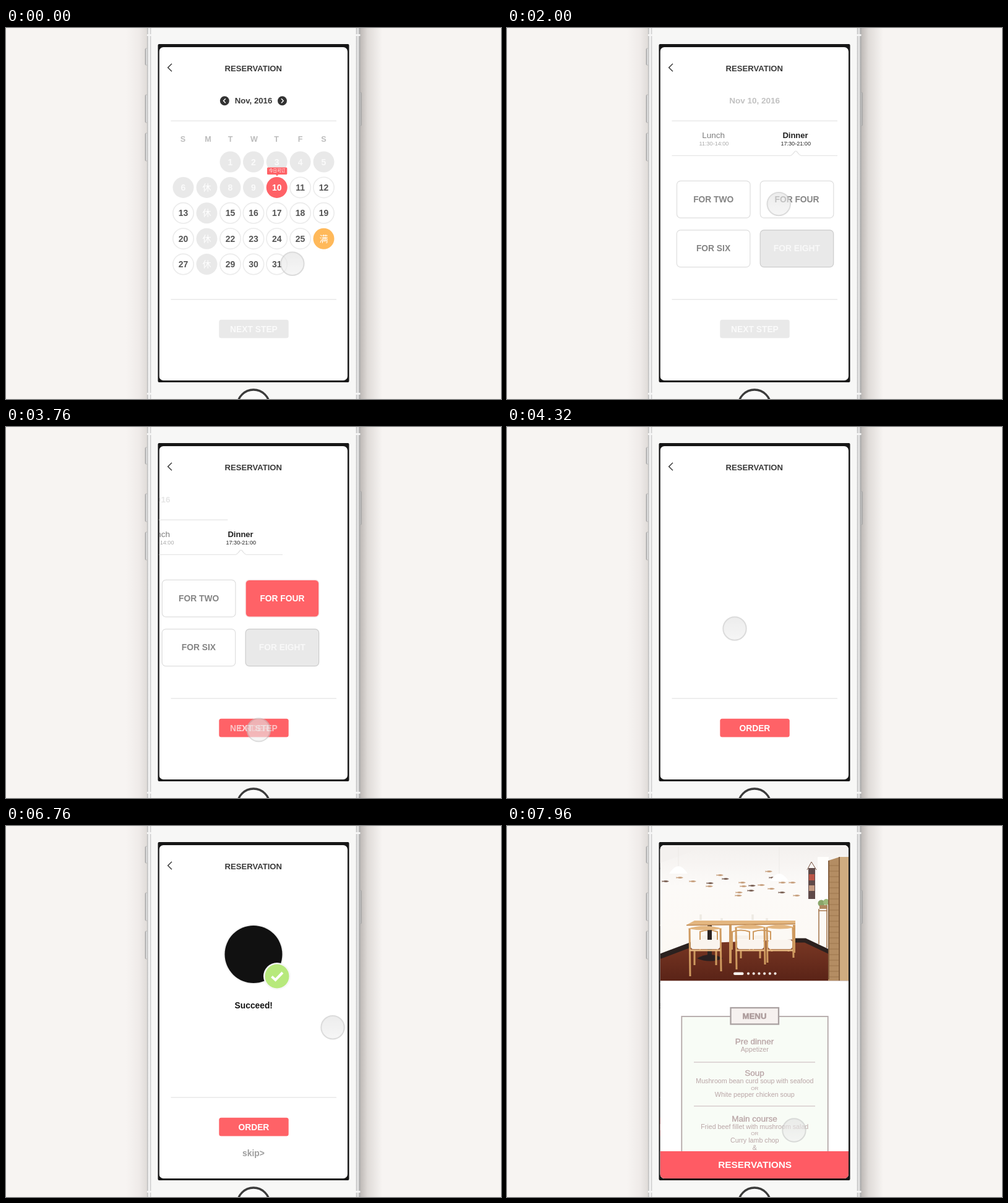
Recreate the animation shown at these times as an HTML page. Size 800 px wide and 600 px high, loop 8 s.

```html
<!DOCTYPE html>
<html lang="en">
<head>
<meta charset="utf-8">
<title>Table reservation</title>
<style>
html, body { margin: 0; width: 100%; height: 100%; overflow: hidden; background: #f7f4f2; }
svg { display: block; width: 100vw; height: 100vh; }
text { font-family: "Liberation Sans", Arial, Helvetica, sans-serif; text-anchor: middle; }
.b { font-weight: bold; }
.cjk { font-family: "Noto Sans CJK SC", "Noto Sans CJK", sans-serif; }
.m { stroke: #b9a5a6; stroke-width: .35; }
</style>
</head>
<body>
<svg id="stage" viewBox="0 0 800 600" xmlns="http://www.w3.org/2000/svg"></svg>
<script>
const LOOP = 8000, RED = '#ff6267', GRAY = '#e9e9e9';

// Markup helpers
const text = (s, x, cy, size, fill, cls = 'b') =>
  `<text x="${x}" y="${cy + size * .36}" font-size="${size}" ${fill && `fill="${fill}"`} class="${cls}">${s}</text>`;
const rect = (x, y, w, h, fill, extra = '') =>
  `<rect x="${x}" y="${y}" width="${w}" height="${h}" fill="${fill}" ${extra}/>`;
const circle = (x, y, r, fill, extra = '') =>
  `<circle cx="${x}" cy="${y}" r="${r}" fill="${fill}" ${extra}/>`;
const path = (d, stroke, width, fill = 'none') =>
  `<path d="${d}" stroke="${stroke}" stroke-width="${width}" fill="${fill}"/>`;
const shape = (d, fill) => `<path d="${d}" fill="${fill}"/>`;
const group = (id, body) => `<g id="${id}">${body}</g>`;
const gradient = (id, dir, ...stops) =>
  `<linearGradient id="${id}" ${dir}>` + stops.map(([o, c]) =>
    `<stop offset="${o}" stop-color="${c}"/>`).join('') + '</linearGradient>';
const across = 'x1="0" x2="1"', down = 'x1="0" x2="0" y1="0" y2="1"';

function defs() {
  return '<defs>' +
    gradient('shadeL', across, [0, '#f7f4f2'], [.6, '#efebe9'], [1, '#dedad7']) +
    gradient('shadeR', across, [0, '#bdb8b5'], [.35, '#dfdbd8'], [1, '#f7f4f2']) +
    gradient('edgeL', across, [0, '#a9a9a9'], [.25, '#e6e6e6'], [.6, '#fafafa'], [.8, '#c9c9c9'], [1, '#f7f7f7']) +
    gradient('edgeR', across, [0, '#f7f7f7'], [.2, '#c6c6c6'], [.5, '#eeeeee'], [.8, '#bbbbbb'], [1, '#8f8f8f']) +
    gradient('key', across, [0, '#8e8e8e'], [.4, '#eeeeee'], [1, '#9a9a9a']) +
    gradient('wall', down, [0, '#f3f0ee'], [.3, '#fcfaf8'], [1, '#fcf8f2']) +
    gradient('floor', down, [0, '#7a3824'], [1, '#5a2317']) +
    gradient('touch', down, [0, '#e2e2e2'], [1, '#f1f1f1']) +
    '<clipPath id="screen"><rect x="247.5" y="31" width="304.5" height="539" rx="7"/></clipPath>' +
    '<clipPath id="frame"><rect x="247.5" y="30" width="304.5" height="220.5"/></clipPath></defs>';
}

function phone() {
  const key = (x, y, h) => rect(x, y, 5, h, 'url(#key)', 'rx="1.5" stroke="#a2a2a2" stroke-width=".6"');
  return rect(0, 0, 800, 600, '#f7f4f2') +
    rect(194, 0, 35, 600, 'url(#shadeL)') + rect(572, 0, 36, 600, 'url(#shadeR)') +
    key(225, 33, 27) + key(225, 108, 45) + key(225, 170, 45) + key(569.5, 104, 54) +
    rect(228, 0, 344.5, 600, '#f7f7f6') +
    rect(228, 0, 7, 600, 'url(#edgeL)') + rect(565, 0, 7.5, 600, 'url(#edgeR)') +
    [10, 590].map(y => rect(228, y, 7, 3, '#f4f4f4') + rect(565, y, 7.5, 3, '#f4f4f4')).join('') +
    circle(400, 611, 26, '#fafafa', 'stroke="#3b3b3b" stroke-width="3.4"') +
    rect(245.5, 26, 309, 547, '#161616', 'rx="2"');
}

const rule = y => path(`M266.5 ${y}H534`, '#e9e9e9', 1.6);

function monthHeader() {
  const arrow = (x, d) => circle(x, 117.8, 7.5, '#333') +
    path(`M${x - 1.5 * d} 114.3l${3.3 * d} 3.5l${-3.3 * d} 3.5`, '#fff', 1.4);
  return text('Nov, 2016', 400, 117.5, 13.2, '#3c3c3c') + arrow(353.3, -1) + arrow(446.5, 1);
}

function calendar() {
  const cols = [286.5, 324.5, 362.5, 400, 437.7, 475.6, 513.5];
  let out = [...'SMTWTFS'].map((c, i) =>
    text(c, [286, 326.5, 362.5, 401, 437, 475.5, 513.5][i], 179, 12.6, '#bcbcbc')).join('');
  for (let day = 1; day <= 31; day++) {
    const cell = day + 1, col = cell % 7, x = cols[col], y = 216.5 + 41.4 * Math.floor(cell / 7);
    const closed = col === 1, full = day === 26, today = day === 10;
    if (closed || full || day <= 10) {
      out += circle(x, y, 17, full ? '#ffb95a' : today ? RED : GRAY);
      out += closed || full ? text(full ? '满' : '休', x, y, 14, '#fff', 'cjk')
                            : text(day, x, y, 14, today ? '#fff' : '#fafafa');
    } else {
      out += circle(x, y, 16.7, '#fff', 'stroke="#ebebeb" stroke-width="1.6"') + text(day, x, y, 14, '#555');
    }
  }
  return out + rect(422, 225.5, 32.3, 11.5, RED, 'rx="1.5"') +
    shape('M435.5 236.5h5l-2.5 3z', RED) + text('今日可订', 438.2, 231, 6.6, '#fff', 'cjk');
}

function tabs() {
  return text('Lunch', 333.6, 173.5, 13.5, '#7d7d7d', '') + text('11:30-14:00', 334.5, 187, 9.1, '#aaa', '') +
    text('Dinner', 466, 173.5, 13, '#1f1f1f') + text('17:30-21:00', 466.7, 187, 9.1, '#222', '') +
    path('M266.5 206.5H457.5Q460 206.5 462 203.5L465 200Q466.7 198 468.4 200L471.4 203.5Q473.5 206.5 476 206.5H534', '#e2e2e2', 1.2);
}

function tables() {
  const box = (label, x, y, id, fill = '#fff', ink = '#858585', line = '#dedede') =>
    rect(x, y, 118.5, 59.8, fill, `rx="6" stroke="${line}" stroke-width="1.2" id="${id}"`) +
    `<g id="${id}Text" fill="${ink}">${text(label, x + 59.2, y + 29.3, 13.8, '')}</g>`;
  return box('FOR TWO', 274.5, 247.3, 'two') + box('FOR FOUR', 409.3, 247.3, 'four') +
    box('FOR SIX', 274.3, 326.8, 'six') + box('FOR EIGHT', 409.2, 326.8, 'eight', GRAY, '#f8f8f8', '#cccccc');
}

function photo() {
  const fish = [257,90, 280,84, 301,90, 329,93, 328,98, 345,80, 354,86, 381,92, 383,98, 397,97, 376,108,
    375,113, 395,105, 412,96, 424,74, 430,84, 428,102, 446,92, 445,108, 462,92, 469,113];
  const wood = '#cf9a5f', pale = '#e3b680';
  let out = rect(247.5, 30, 304.5, 220.5, 'url(#wall)') +
    shape('M247 30H552V48L480 37H310L247 60z', '#f4f1ef') +
    shape('M247 212L300 190L478 183L552 215V250.5H247z', 'url(#floor)') +
    path('M247 211L300 191', '#2b211f', 8) + path('M466 185H482L524 205', '#2b211f', 7);
  for (let i = 0; i < fish.length; i += 2) {
    const [x, y] = [fish[i], fish[i + 1]];
    out += shape(`M${x - 5} ${y - 1}q6 -2.4 10 .5q-4 2.6 -10 .5l-1.5 1v-3z`, i % 3 ? '#c7a07e' : '#7b6155');
  }
  const lamp = (x, y) => path(`M${x} 34V${y - 9}`, '#eae7e4', .7) +
    shape(`M${x - 15} ${y}Q${x - 7} ${y - 12} ${x} ${y - 12}T${x + 15} ${y}z`, '#ffffff');
  out += lamp(277, 77) + lamp(440, 89);
  // Far chairs, table
  for (const x of [326, 378, 412])
    out += path(`M${x - 14} 200V171Q${x} 166 ${x + 14} 171V200`, wood, 2) + rect(x - 12, 177, 24, 6, '#f7f1e9');
  out += rect(324, 160, 7, 56, '#2b2321') + shape('M307 214Q328 202 349 214Q328 223 307 214z', '#2a2020') +
    shape('M290 160L303 153H466V159z', pale) + path('M290 160.5L466 158.5', '#bd8750', 1.6) +
    path('M361 160V222M464 160V205', wood, 4) +
    path('M313 152v-9M347 153v-4M397 152v-9M420 153v-4', '#eeeae3', 3.5);
  const chair = (x, w, y, end) =>
    shape(`M${x - w} ${y}Q${x} ${y - 9} ${x + w} ${y}Q${x} ${y + 5} ${x - w} ${y}z`, pale) +
    path(`M${x - w + 3} ${y}L${x - w + 4} ${end}M${x + w - 3} ${y}L${x + w - 2} ${end - 8}` +
      `M${x - w + 11} 200V${end - 18}M${x + w - 10} 200V${end - 18}`, wood, 3) +
    path(`M${x - w + 3} 201H${x + w - 3}`, pale, 3) + rect(x - w + 5, 184, 2 * w - 9, 15, '#faf4ee', 'rx="4"');
  out += chair(441, 24, 164, 221) + chair(393, 26, 164, 232) + chair(320, 28, 166, 243);
  // Hanging, plant stand, screen door
  out += path('M485 71L492 58L500 71', '#76513f', 1) + rect(487, 68, 11, 50, '#5f4a49') +
    rect(488, 78, 9, 10, '#bb5546') + rect(488, 96, 9, 9, '#c49a81') +
    rect(502, 50, 18, 72, '#fffefc') + path('M504 134V191M517 134V197M503 137H518', '#a87950', 1.6) +
    circle(508, 125, 5.5, '#8aa56a') + circle(516, 123, 5, '#9db97c') + rect(505, 128, 13, 6, '#b08860') +
    shape('M519 56L538 50V250H519z', '#b48d63') + rect(538, 50, 14, 200, '#cfac80') +
    path('M520 56V248M537 50V250', '#86613f', 2);
  for (let y = 64; y < 245; y += 9) out += path(`M521 ${y}H536`, '#9d774d', 1.2);
  out += rect(366, 236.5, 16.5, 4.5, '#f8f2ee', 'rx="2.2"');
  for (let i = 0; i < 6; i++) out += circle(390 + i * 8.7, 238.7, 2.1, '#f3ebe5');
  return `<g clip-path="url(#frame)">${out}</g>`;
}

function menu() {
  const ink = '#b9a5a6', head = (s, y) => text(s, 400, y, 13.5, ink, 'm');
  const dish = (s, y, size = 10.7) => text(s, 400.3, y, size, ink, '');
  return rect(247.5, 30, 304.5, 540, '#fff') + photo() +
    rect(282.3, 308, 236.4, 240, '#f8fcf6', 'stroke="#b3a8a8" stroke-width="1.8"') +
    rect(361.5, 294, 77.5, 26.5, '#f6f1ef', 'stroke="#aaa1a1" stroke-width="2.3"') +
    `<g stroke="#ad9c9c" stroke-width=".6">${text('MENU', 400, 307, 13.2, '#ad9c9c')}</g>` +
    head('Pre dinner', 348) + dish('Appetizer', 361) + path('M302 382H498M302 453H498', '#d8cdcd', 1.3) +
    head('Soup', 399.5) + dish('Mushroom bean curd soup with seafood', 412.5) + dish('OR', 424, 8) +
    dish('White pepper chicken soup', 434.5) +
    head('Main course', 473.3) + dish('Fried beef fillet with mushroom salad', 486.3) + dish('OR', 497.5, 8) +
    dish('Curry lamb chop', 508) + dish('&amp;', 520) +
    rect(247.5, 526, 304.5, 45, '#ff5b64') + text('RESERVATIONS', 400.6, 547, 15.4, '#fff');
}

function booking() {
  return rect(247.5, 30, 304.5, 541, '#fff') +
    path('M268 57.8L261.7 64L268 70.2', '#444', 1.6) + text('RESERVATION', 399.8, 64.8, 13.1, '#3a3a3a') +
    group('month', monthHeader()) + group('date', text('Nov 10, 2016', 400.2, 117.3, 13.5, '#c2c2c2')) +
    group('topRule', rule(150.3)) + group('days', calendar()) +
    group('tabs', tabs()) + group('tables', tables()) + rule(439) +
    rect(344.3, 471.8, 112.4, 29.7, GRAY, 'rx="3.5" id="button"') +
    group('next', text('NEXT STEP', 400.4, 486.7, 13.85, '#fafafa')) +
    group('order', text('ORDER', 400.4, 486.7, 13.8, '#fff')) +
    group('logo', circle(400, 207.5, 48.5, '#f2f2f2') + circle(400, 207.5, 46.5, '#111')) +
    group('badge', circle(438, 243, 22, '#f7f7f7') + circle(438, 243, 19.5, '#b7e97c') +
      path('M429.5 243.5L435.5 249L447 237', '#fff', 4)) +
    group('done', text('Succeed!', 400.3, 290.5, 13.8, '#111')) +
    group('skip', text('skip&gt;', 400, 528.5, 13.9, '#9d9d9d'));
}

document.getElementById('stage').innerHTML = defs() + phone() +
  '<g clip-path="url(#screen)">' + group('booking', booking()) +
  group('dim', rect(247, 30, 306, 541, '#000')) + group('menu', menu()) + '</g>' +
  group('cursor', circle(0, 0, 18.7, 'url(#touch)', 'stroke="#c6c6c6" stroke-width="2"'));

// Motion
const el = {};
document.querySelectorAll('g[id], rect[id]').forEach(n => el[n.id] = n);
const clamp = v => Math.max(0, Math.min(1, v));
const span = (t, a, b) => clamp((t - a) / (b - a));
const inOut = u => u < .5 ? 4 * u ** 3 : 1 - 4 * (1 - u) ** 3;
const out = u => 1 - (1 - u) ** 3;
const back = u => 1 + 2.7 * (u - 1) ** 3 + 1.7 * (u - 1) ** 2;
const rgb = h => [1, 3, 5].map(i => parseInt(h.slice(i, i + 2), 16));
const mix = (a, b, u) => {
  const p = rgb(a), q = rgb(b);
  return `rgb(${p.map((v, i) => Math.round(v + (q[i] - v) * u))})`;
};
const move = (n, x, y = 0) => n.setAttribute('transform', `translate(${x} ${y})`);
const fade = (n, o) => n.setAttribute('opacity', o);

// Touch route: time, x, y
const route = [
  [0, 463, 381], [480, 403, 481], [640, 403, 481], [1000, 406, 452], [1360, 345, 352], [1700, 313, 300],
  [2160, 479, 283], [2440, 479, 283], [2720, 514, 360], [3040, 483, 432], [3300, 402, 489],
  [3560, 402, 489], [4060, 414, 462], [4310, 368, 326], [5700, 368, 326], [6060, 425, 210],
  [6540, 496, 247], [6860, 531, 370], [7100, 470, 490], [7260, 400, 528], [7380, 400, 528],
  [7560, 406, 482], [7960, 464, 492], [8000, 464, 492]
];
const same = (a, b) => a[1] === b[1] && a[2] === b[2];

function slope(i, k) {
  const a = route[Math.max(0, i - 1)], p = route[i], b = route[Math.min(route.length - 1, i + 1)];
  if ((a !== p && same(a, p)) || (b !== p && same(b, p))) return 0;
  return (b[k] - a[k]) / (b[0] - a[0]);
}

function along(t) {
  let i = 0;
  while (i < route.length - 2 && t >= route[i + 1][0]) i++;
  const a = route[i], b = route[i + 1], d = b[0] - a[0], u = span(t, a[0], b[0]);
  return [1, 2].map(k => a[k] * (1 + 2 * u) * (1 - u) ** 2 + b[k] * u * u * (3 - 2 * u) +
    d * (slope(i, k) * u * (1 - u) ** 2 + slope(i + 1, k) * u * u * (u - 1)));
}

function draw(t) {
  const ease = (a, b) => inOut(span(t, a, b));
  // Step one to step two, then out
  const monthOut = ease(556, 1139), daysOut = ease(600, 1183), tablesIn = ease(612, 1195);
  const dateOut = ease(3460, 4030), tabsOut = ease(3520, 4100), tablesOut = ease(3590, 4240);
  move(el.month, -203 * monthOut);
  fade(el.month, 1 - clamp(monthOut * .85 + span(monthOut, .95, 1) * .2));
  move(el.days, -303 * daysOut);
  fade(el.days, daysOut < 1 ? 1 : 0);
  move(el.date, 203 * (1 - monthOut) - 303 * dateOut);
  fade(el.date, monthOut * (1 - dateOut));
  move(el.topRule, -303 * dateOut);
  move(el.tabs, 303 * (1 - daysOut) - 303 * tabsOut);
  move(el.tables, 303 * (1 - tablesIn) - 303 * tablesOut);

  const picked = span(t, 2440, 2640);
  el.four.setAttribute('fill', mix('#ffffff', RED, picked));
  el.four.setAttribute('stroke', mix('#dedede', '#f3dcdd', picked));
  el.fourText.setAttribute('fill', mix('#858585', '#ffffff', picked));

  const hot = t < 1700 ? span(t, 40, 400) * (1 - span(t, 600, 1045)) : span(t, 2880, 3290);
  el.button.setAttribute('fill', mix(GRAY, RED, hot));
  const swap = span(t, 3600, 4050);
  fade(el.next, 1 - swap);
  fade(el.order, swap);

  // Confirmation
  const drop = out(span(t, 4860, 5400));
  move(el.logo, 0, -96 * (1 - drop));
  fade(el.logo, span(t, 4860, 5200));
  const pop = span(t, 5240, 5620), s = pop ? back(pop) : 0;
  el.badge.setAttribute('transform', `translate(438 243) scale(${s}) translate(-438 -243)`);
  move(el.done, 0, 14 * (1 - out(span(t, 5160, 5620))));
  fade(el.done, span(t, 5160, 5560));
  fade(el.skip, span(t, 5760, 6200));

  // Push to the menu page
  const push = ease(7372, 7756);
  move(el.booking, -304.5 * .525 * push);
  fade(el.dim, .49 * push);
  move(el.menu, 304.5 * (1 - push));
  fade(el.menu, push > 0 ? 1 : 0);

  const [x, y] = along(t);
  const press = Math.max(...[570, 2500, 3420, 7320].map(c => 1 - Math.min(1, Math.abs(t - c) / 90)));
  el.cursor.setAttribute('transform', `translate(${x} ${y}) scale(${1 - .1 * press})`);
  fade(el.cursor, .62);
}

function tick(now) {
  draw(now % LOOP);
  requestAnimationFrame(tick);
}
draw(0);
requestAnimationFrame(tick);
</script>
</body>
</html>
```
